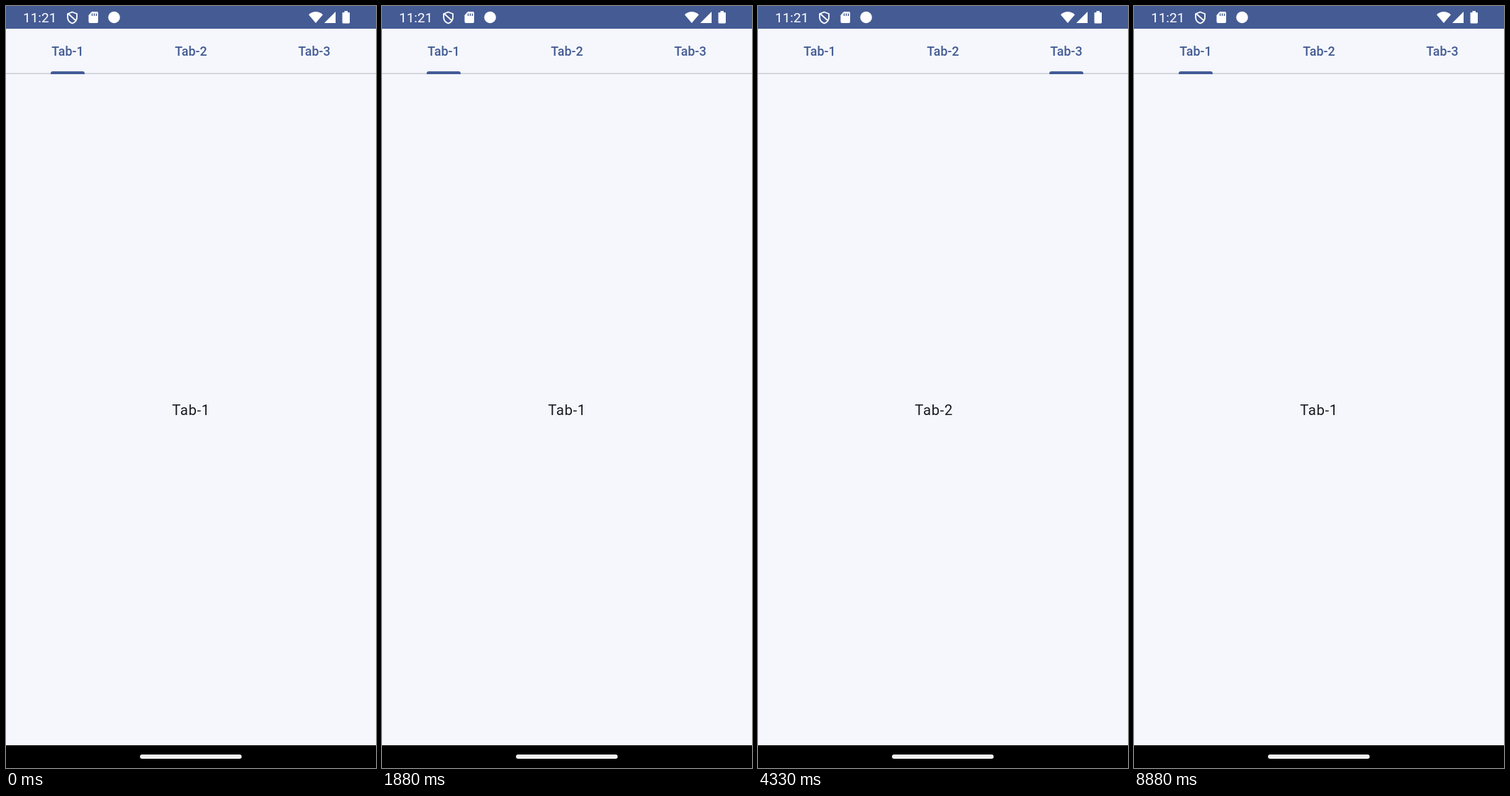
Animation, 522 px wide and 1073 px high, one loop 9.08 s. Source, as an HTML page:

```html
<!DOCTYPE html>
<html lang="en">
<head>
<meta charset="utf-8">
<title>Tabs with pager</title>
<style>
  html, body { margin: 0; width: 100%; height: 100%; overflow: hidden; background: #f5f7fc; }
  svg { display: block; width: 522px; height: 1073px; font-family: Roboto, sans-serif; }
  .tab { font-size: 17.8px; font-weight: 500; letter-spacing: .13px; fill: #435b93; text-anchor: middle; }
  .page { font-size: 20.3px; letter-spacing: .64px; fill: #1a1b20; text-anchor: middle; }
</style>
</head>
<body>
<svg viewBox="0 0 522 1073">
  <defs>
    <radialGradient id="soft">
      <stop offset="0" stop-color="#435b93" stop-opacity=".13"/>
      <stop offset=".65" stop-color="#435b93" stop-opacity=".11"/>
      <stop offset="1" stop-color="#435b93" stop-opacity="0"/>
    </radialGradient>
    <clipPath id="row"><rect y="32" width="522" height="62"/></clipPath>
  </defs>

  <rect width="522" height="1073" fill="#f5f7fc"/>
  <g id="pages"></g>

  <rect y="94.5" width="522" height="1.2" fill="#bfc3cf"/>
  <g clip-path="url(#row)"><circle id="ripple" cy="63" fill="url(#soft)"/></g>
  <g id="tabs"></g>
  <path id="indicator" d="M63 96v-1q0-3 3-3h42q3 0 3 3v1z" fill="#435b97"/>

  <rect width="522" height="32" fill="#455b94"/>
  <g fill="#fff">
    <text x="24" y="23" font-size="19">11:21</text>
    <path d="M93.5 8.5l6.5 2.5v5q0 6-6.5 8.5q-6.500-2.500-6.500-8.500v-5zM88 11l11 10" fill="none" stroke="#fff" stroke-width="1.8"/>
    <path d="M121 8h7q2 0 2 2v12q0 2-2 2h-9.500q-2 0-2-2v-9z"/>
    <path d="M121.500 10.500v3.500M124.500 10.500v3.500M127.500 10.500v3.500" stroke="#455b94" stroke-width="1.4"/>
    <circle cx="152.500" cy="16" r="8.300"/>
    <path d="M427 12.200Q437 4 447 12.200L437 24z"/>
    <path d="M465 8v16h-16z"/>
    <path d="M477.500 7h4.500v2h2q1 0 1 1v13q0 1.500-1.500 1.500h-7.500q-1.500 0-1.500-1.500v-13q0-1 1-1h2z"/>
  </g>

  <rect y="1041" width="522" height="32" fill="#000"/>
  <rect x="189" y="1054" width="143.500" height="6" rx="3" fill="#f1f1f3"/>
</svg>
<script>
const LOOP = 9080, WIDTH = 522, TAB = 174, OMEGA = 0.02;
const byId = id => document.getElementById(id);
const clamp = x => Math.max(0, Math.min(1, x));
const progress = (t, start, length) => clamp((t - start) / length);

const presses = [
  { tab: 1, down: 2170, up: 2310 },
  { tab: 2, down: 3040, up: 3210 }
];
const swipes = [4000, 4830];
const SETTLED = 350;

// cubic-bezier(.4, 0, .2, 1), solved by bisection
function standardEase(x) {
  let low = 0, high = 1, u = x;
  for (let i = 0; i < 20; i++) {
    u = (low + high) / 2;
    if (3 * u * (1 - u) ** 2 * 0.4 + 3 * u * u * (1 - u) * 0.2 + u ** 3 < x) low = u;
    else high = u;
  }
  return u * u * (3 - 2 * u);
}

// Critically damped approach to a page after a tap
function tapScroll(t) {
  const s = Math.max(0, t) * OMEGA;
  return 1 - (1 + s) * Math.exp(-s);
}

// Finger drag, then a spring that keeps the finger's speed
function swipeScroll(t) {
  const drag = 105, moved = 222, left = WIDTH - moved, speed = moved / drag;
  if (t <= drag) return Math.max(0, t) * speed / WIDTH;
  const s = t - drag;
  return 1 - (left + (OMEGA * left - speed) * s) * Math.exp(-OMEGA * s) / WIDTH;
}

function label(parent, cls, x, y, text) {
  const node = document.createElementNS("http://www.w3.org/2000/svg", "text");
  node.setAttribute("class", cls);
  node.setAttribute("x", x);
  node.setAttribute("y", y);
  node.textContent = text;
  byId(parent).append(node);
}
for (let i = 0; i < 3; i++) {
  label("tabs", "tab", 87 + i * TAB, 70, `Tab-${i + 1}`);
  label("pages", "page", 261 + i * WIDTH, 576, `Tab-${i + 1}`);
}

function draw(t) {
  let page = 0, selected = 0;
  for (const { up } of presses) {
    page += tapScroll(t - up);
    selected += standardEase(progress(t, up, 250));
  }
  for (const start of swipes) {
    page -= swipeScroll(t - start);
    selected -= standardEase(progress(t, start + SETTLED, 230));
  }
  byId("pages").setAttribute("transform", `translate(${-page * WIDTH} 0)`);
  byId("indicator").setAttribute("transform", `translate(${selected * TAB} 0)`);

  const press = presses.findLast(p => t >= p.down) || presses[0];
  const grow = progress(t, press.down, 300);
  const ripple = byId("ripple");
  ripple.setAttribute("cx", 84 + press.tab * TAB);
  ripple.setAttribute("r", 35 + 65 * (1 - (1 - grow) ** 1.5) * 0.6);
  ripple.setAttribute("opacity", progress(t, press.down, 75) * (1 - progress(t, press.up + 100, 300)));
}

const begin = performance.now();
function frame() {
  draw((performance.now() - begin) % LOOP);
  requestAnimationFrame(frame);
}
frame();
</script>
</body>
</html>
```
